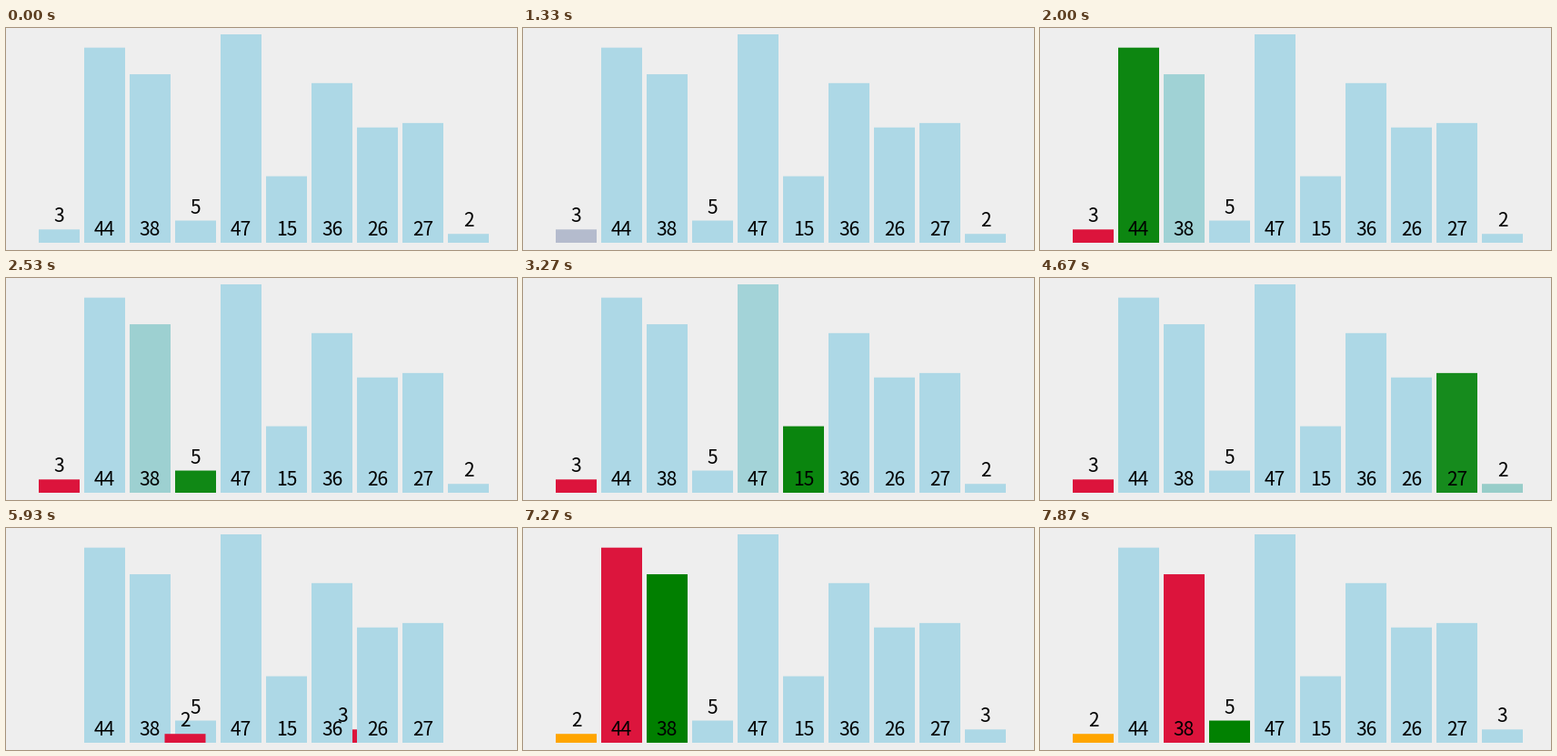
A matplotlib script for the animation above (8 s loop, 562 by 245 pixels).

```python
import numpy as np
import matplotlib.pyplot as plt
from matplotlib.animation import FuncAnimation
from matplotlib.colors import to_rgb
from matplotlib.patches import Rectangle

WIDTH, HEIGHT, DPI = 562, 245, 100
LOOP_MS, INTERVAL = 8000, 20
TICK = 1000 / 15          # the picture is refreshed 15 times a second
FADE = 250

VALUES = [3, 44, 38, 5, 47, 15, 36, 26, 27, 2]
LEFT, PITCH, BAR_W, BASE = 36, 50, 45, 237
UNIT = 230 / max(VALUES)
FONT_PX = 21

PLAIN, CHECKED, LOWEST, SORTED = map(
    to_rgb, ("lightblue", "green", "crimson", "orange"))

# Colour changes: (start ms, bar, colour, duration)
changes = [(1183, 0, LOWEST, FADE), (1550, 1, CHECKED, FADE)]
for i, start in enumerate([1934, 2288, 2718, 3078, 3440, 3815, 4240, 4588], 1):
    changes += [(start, i, PLAIN, FADE), (start, i + 1, CHECKED, FADE)]
changes += [
    (4984, 0, PLAIN, FADE), (4984, 9, LOWEST, FADE),
    (5385, 0, LOWEST, 170),
    (6085, 0, PLAIN, FADE), (6085, 9, SORTED, FADE),
    (6483, 1, LOWEST, FADE),
    (6883, 2, CHECKED, FADE),
    (7240, 1, PLAIN, FADE), (7240, 2, LOWEST, FADE),
    (7645, 3, CHECKED, FADE),
]
SWAP_START, SWAPPED = 5723, (0, 9)


def ease(t, start, duration=FADE):
    """Cubic in-out progress of a transition."""
    p = min(max((t - start) / duration, 0), 1)
    return 4 * p ** 3 if p < 0.5 else 1 - 4 * (1 - p) ** 3


def bar_color(bar, t):
    color = np.array(PLAIN)
    for start, index, goal, duration in changes:
        if index == bar:
            color = color + (np.array(goal) - color) * ease(t, start, duration)
    return np.clip(color, 0, 1)


def bar_left(bar, t):
    slot = bar
    if bar in SWAPPED:
        slot += (sum(SWAPPED) - 2 * bar) * ease(t, SWAP_START)
    return LEFT + PITCH * slot


fig = plt.figure(figsize=(WIDTH / DPI, HEIGHT / DPI), dpi=DPI,
                 facecolor="#eeeeee")
ax = fig.add_axes([0, 0, 1, 1])
ax.set(xlim=(0, WIDTH), ylim=(HEIGHT, 0))
ax.axis("off")

bars, labels = [], []
for i, value in enumerate(VALUES):
    x, top = bar_left(i, 0), BASE - value * UNIT
    bar = Rectangle((x, top), BAR_W, BASE - top, lw=0, fc=PLAIN, snap=False)
    bars.append(ax.add_patch(bar))
    baseline = (top if value < 10 else BASE) - 8
    labels.append(ax.text(x + BAR_W / 2, baseline, str(value), zorder=3,
                          ha="center", va="baseline", color="black",
                          family="Noto Sans CJK JP",
                          fontsize=FONT_PX * 72 / DPI))


def update(frame):
    t = int((frame * INTERVAL + INTERVAL / 2) / TICK) * TICK
    for i, (bar, label) in enumerate(zip(bars, labels)):
        x = bar_left(i, t)
        bar.set_x(x)
        bar.set_facecolor(bar_color(i, t))
        label.set_x(x + BAR_W / 2)
    return bars + labels


anim = FuncAnimation(fig, update, frames=LOOP_MS // INTERVAL,
                     interval=INTERVAL, repeat=True, repeat_delay=0)
plt.show()
```
